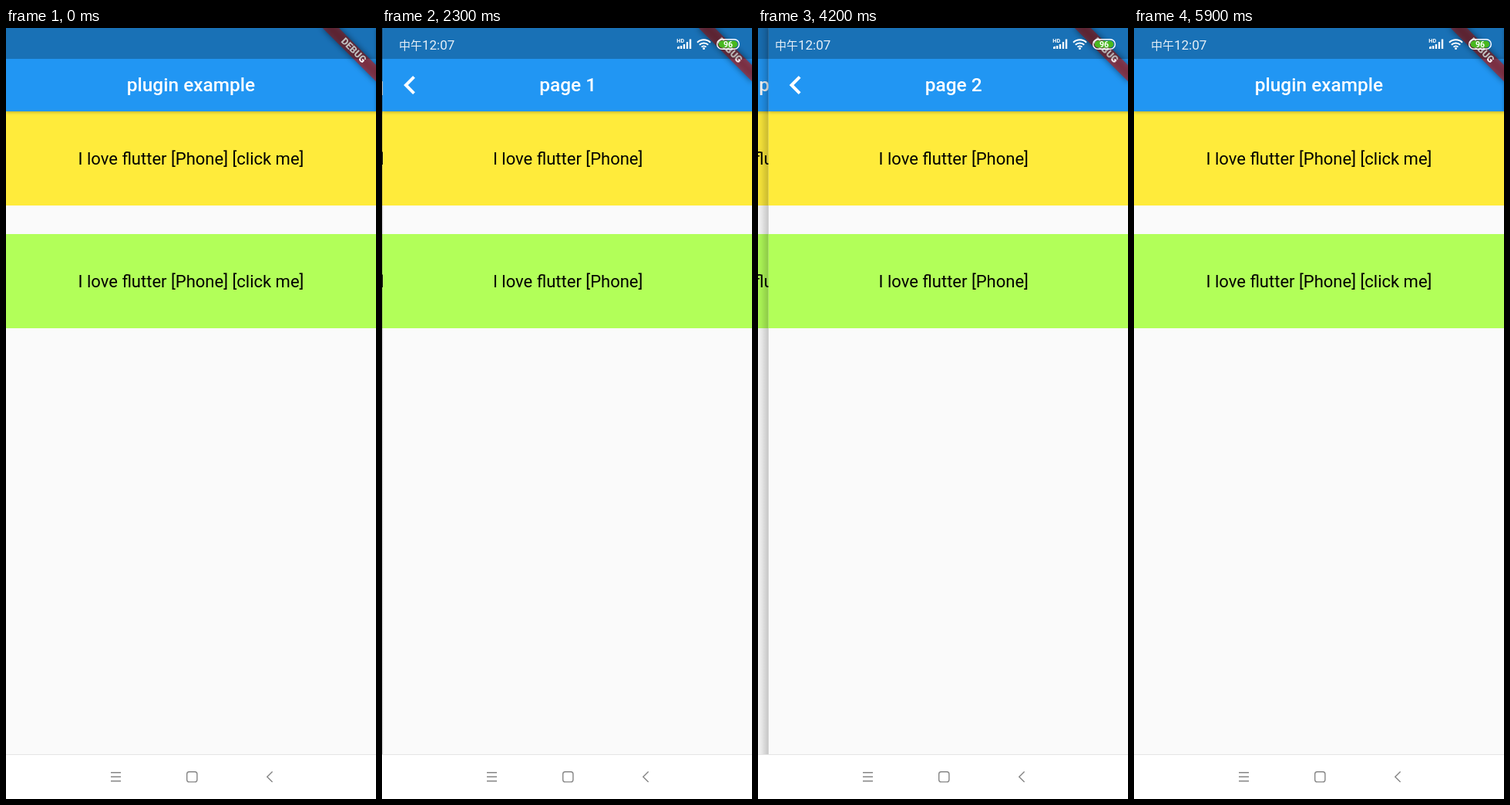
These frames come from a looping animation (480x999 px, 6 s). An HTML page:

```html
<!DOCTYPE html>
<html lang="en">
<head>
<meta charset="utf-8">
<title>plugin example</title>
<style>
@property --p { syntax: "<number>"; inherits: true; initial-value: 0; }

html, body { margin: 0; width: 100%; height: 100%; overflow: hidden; background: #fff; }
body { position: relative; font-family: Roboto, sans-serif; }
div, h1, p, svg { position: absolute; margin: 0; }

.app {
  left: 0; top: 0; width: 480px; height: 941px; overflow: hidden;
  animation: slide 6s infinite;
}
.page { left: 0; top: 0; width: 480px; height: 941px; background: #fafafa; }
.home { transform: translateX(calc(var(--p) * -160px)); }
.detail { transform: translateX(calc((1 - var(--p)) * 480px)); }

/* edge shadow, growing with the page's progress */
.detail::before {
  content: ""; position: absolute; right: 100%; top: 0; width: 24px; height: 100%;
  opacity: var(--p);
  background: linear-gradient(90deg, #0000, #00000004 30%, #00000012 60%, #00000038);
}

.bar {
  left: 0; top: 0; width: 480px; height: 108px; background: #2196f3; color: #fff;
  box-shadow: 0 1px 4px #00000048;
}
h1 {
  left: 0; top: 39.6px; width: 100%; text-align: center; white-space: nowrap;
  font-size: 24.44px; font-weight: 500; line-height: 68.4px;
}
.back { left: 0; top: 40px; fill: none; stroke: #fff; stroke-width: 4; }
.box {
  left: 0; width: 480px; height: 122px; color: #000;
  font-size: 22px; line-height: 123px; text-align: center; white-space: nowrap;
}
.yellow { top: 108px; background: #ffeb3b; }
.green { top: 267px; background: #b2ff59; }

.first { animation: first 6s infinite steps(1, end); }
.second { animation: second 6s infinite steps(1, end); }

.banner { left: 480px; top: 0; transform: rotate(45deg); transform-origin: 0 0; }
.banner div { left: -48.9px; top: 34.2px; width: 97.8px; height: 14.7px; }
.banner .shade { background: #0000007f; filter: blur(4.2px); }
.banner .strip {
  background: #b71c1ca0; color: #fff; text-align: center;
  font-size: 12.47px; font-weight: 900; line-height: 14.7px;
}
.scrim { left: 0; top: 0; width: 480px; height: 39.6px; background: #00000040; }

.status { left: 0; top: 0; width: 480px; height: 40px; animation: appear 6s infinite steps(1, end); }
.status text { font-family: Roboto, sans-serif; }
.status .noon { font-family: "Noto Sans CJK SC", "Noto Sans CJK", sans-serif; }

.nav { left: 0; top: 941px; width: 480px; height: 58px; background: #fff; box-shadow: inset 0 1px #e4e4e4; }

@keyframes slide {
  0%, 32.017% { --p: 0; animation-timing-function: cubic-bezier(.35, .91, .33, .97); }
  38.683% { --p: 1; }
  52.417% { --p: 1; animation-timing-function: cubic-bezier(.35, .91, .33, .97); }
  59.083% { --p: 0; }
  65.55% { --p: 0; animation-timing-function: cubic-bezier(.35, .91, .33, .97); }
  72.217% { --p: 1; }
  82.458% { --p: 1; animation-timing-function: cubic-bezier(.35, .91, .33, .97); }
  89.125%, 100% { --p: 0; }
}
@keyframes first { 0% { opacity: 1; } 62%, 100% { opacity: 0; } }
@keyframes second { 0% { opacity: 0; } 62%, 100% { opacity: 1; } }
@keyframes appear { 0% { opacity: 0; } 1.66%, 100% { opacity: 1; } }
</style>
</head>
<body>
<div class="app">
  <div class="page home">
    <p class="box yellow">I love flutter [Phone] [click me]</p>
    <p class="box green">I love flutter [Phone] [click me]</p>
    <div class="bar"><h1>plugin example</h1></div>
  </div>
  <div class="page detail">
    <p class="box yellow">I love flutter [Phone]</p>
    <p class="box green">I love flutter [Phone]</p>
    <div class="bar">
      <svg class="back" width="60" height="68"><path d="M40.4 23.4 29.8 34l10.6 10.6"/></svg>
      <h1 class="first">page 1</h1>
      <h1 class="second">page 2</h1>
    </div>
  </div>
  <div class="banner"><div class="shade"></div><div class="strip">DEBUG</div></div>
  <div class="scrim"></div>
</div>

<div class="status">
  <svg width="480" height="40" fill="#fff" font-weight="700">
    <g fill="#e6eff7" font-weight="400">
      <text class="noon" x="22" y="27.5" font-size="15">中午</text>
      <text x="52" y="28" font-size="17">12:07</text>
    </g>
    <text x="382.3" y="18.8" font-size="7.2">HD</text>
    <path d="M383 27v-2.5l3-1V27zM387 27v-4h2.3v4zM390.8 27v-6h2.3v6zM394.8 27v-9h2.3v9zM398.8 27V14.5h2.4V27z"/>
    <g fill="none" stroke="#fff" stroke-width="2">
      <path d="M409 18.7a12.2 12.2 0 0 1 17 0M411.8 21.8a8 8 0 0 1 11.4 0M414.5 24.6a4.3 4.3 0 0 1 6 0"/>
    </g>
    <circle cx="417.5" cy="26.6" r="1.5"/>
    <rect x="434.7" y="14.7" width="28.6" height="12.6" rx="6.3" fill="none" stroke="#fff" stroke-width="1.4"/>
    <rect x="436.6" y="16.6" width="24.8" height="8.8" rx="4.4" fill="#48b81f"/>
    <text x="449" y="24.8" font-size="10.5" text-anchor="middle">96</text>
  </svg>
</div>

<div class="nav">
  <svg width="480" height="58" fill="none" stroke="#858585" stroke-width="1.4">
    <path d="M136 23.7h13M136 29.2h13M136 34.8h13"/>
    <rect x="234.7" y="22.7" width="13.2" height="13.2" rx="3"/>
    <path d="M345.6 22.6 338.8 29.3 345.6 36"/>
  </svg>
</div>
</body>
</html>
```
